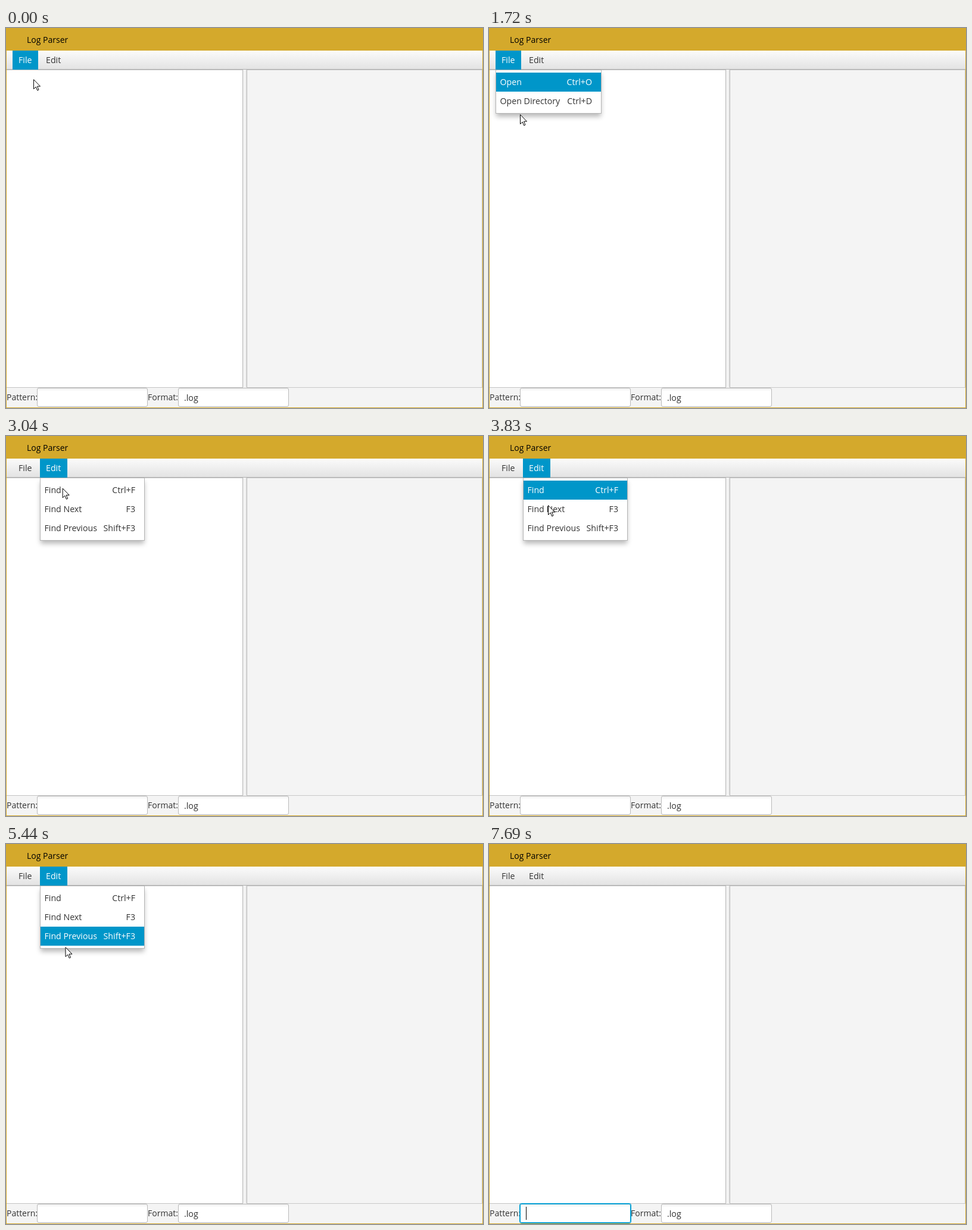
Write an HTML page that moves like this. It is 801 px wide and 639 px high and loops after 8 s.

```html
<!DOCTYPE html>
<html lang="en">
<head>
<meta charset="utf-8">
<title>Log Parser</title>
<style>
  :root { --gold: #d4a92c; --blue: #0096c9; --ink: #333; --line: #bababa; --panel: #f4f4f4; }
  html, body { margin: 0; width: 100%; height: 100%; overflow: hidden; }
  body { font: 14.2px/32px "Open Sans", "Noto Sans", sans-serif; color: var(--ink); white-space: pre; }
  div, svg, span { position: absolute; box-sizing: border-box; }
  #stage { left: 0; top: 0; width: 801px; height: 639px; overflow: hidden; background: var(--panel); }

  .title { left: 0; top: 0; width: 801px; height: 38px; background: var(--gold); }
  .title span { left: 35px; top: 4px; font-size: 14px; color: #000; }
  .frame { inset: 0; border: 1px solid var(--gold); }

  .bar { left: 1px; top: 38px; width: 799px; height: 32px; background: linear-gradient(#fbfbfb, #e3e3e3); border-bottom: 1px solid #b0b0b0; }
  .tab { top: 38px; height: 32px; padding-left: 10px; }
  .left { left: 1px; top: 70px; width: 397px; height: 535px; background: #fff; border: solid #c4c4c4; border-width: 1px 0; }
  .split { left: 397px; top: 70px; width: 8px; height: 534px; border: solid var(--line); border-width: 0 1px; background: linear-gradient(90deg, #eaeaea, #f8f8f8 50%, #dedede); }
  .right { left: 404px; top: 70px; width: 396px; height: 535px; border: 1px solid #c8c8c8; }

  .label { top: 605px; font-size: 14px; line-height: 31px; }
  .field { top: 605px; width: 186px; height: 32px; padding-left: 9px; border: 1px solid var(--line); border-radius: 3px; background: linear-gradient(#f0f0f0, #fff 5px); }
  .caret { left: 61.5px; top: 610px; width: 1.3px; height: 22px; background: #000; }

  .menu { top: 70px; padding: 4px 0; border: 1px solid #b5b5b5; background: #fff; box-shadow: 0 6px 8px -1px rgba(0, 0, 0, .28); }
  .row { position: relative; height: 32px; padding-left: 6.5px; }
  .row span { right: 15px; }

  .tab, .row, .menu, .field, .caret, .arrow, .beam { animation: 8s step-end infinite; }
  .file { animation-name: file; }
  .edit { animation-name: edit; }
  .fileMenu { left: 11px; width: 178px; animation-name: fileMenu; }
  .editMenu { left: 57px; width: 176px; animation-name: editMenu; }
  .open { animation-name: open; }
  .dir { animation-name: dir; }
  .find { animation-name: find; }
  .next { animation-name: next; }
  .prev { animation-name: prev; }
  .pattern { animation-name: focus; }
  .caret { animation-name: blink; }
  .arrow { animation-name: arrow; }
  .beam { animation-name: beam; }
  .pointer { left: 0; top: 0; animation: move 8s infinite; }
  .pointer svg { overflow: visible; width: 12px; height: 20px; }

  @keyframes file {
    0% { background-color: var(--blue); color: #fff; }
    37.99%, 100% { background-color: transparent; color: var(--ink); }
  }
  @keyframes edit {
    0%, 82.5%, 100% { background-color: transparent; color: var(--ink); }
    37.99% { background-color: var(--blue); color: #fff; }
  }
  @keyframes fileMenu {
    0%, 36.12%, 100% { visibility: hidden; }
    8.87% { visibility: visible; }
  }
  @keyframes editMenu {
    0%, 82.5%, 100% { visibility: hidden; }
    37.99% { visibility: visible; }
  }
  @keyframes open {
    0%, 22.4%, 100% { background-color: transparent; color: var(--ink); }
    14.62%, 31.2% { background-color: var(--blue); color: #fff; }
  }
  @keyframes dir {
    0%, 31.2%, 100% { background-color: transparent; color: var(--ink); }
    22.4% { background-color: var(--blue); color: #fff; }
  }
  @keyframes find {
    0%, 55.5%, 100% { background-color: transparent; color: var(--ink); }
    47.8% { background-color: var(--blue); color: #fff; }
  }
  @keyframes next {
    0%, 66.1%, 100% { background-color: transparent; color: var(--ink); }
    55.5% { background-color: var(--blue); color: #fff; }
  }
  @keyframes prev {
    0%, 82.5%, 100% { background-color: transparent; color: var(--ink); }
    66.1% { background-color: var(--blue); color: #fff; }
  }
  @keyframes focus {
    0% { border-color: var(--line); box-shadow: none; }
    82.5%, 100% { border-color: #039ed3; box-shadow: 0 0 0 1px #039ed3; }
  }
  @keyframes blink {
    0%, 90.24% { visibility: hidden; }
    84.49%, 96.12%, 100% { visibility: visible; }
  }
  @keyframes arrow {
    0% { visibility: visible; }
    80.7%, 100% { visibility: hidden; }
  }
  @keyframes beam {
    0% { visibility: hidden; }
    80.7%, 100% { visibility: visible; }
  }

  /* Each move is a run of equal hops; the grouped percentages are rests. */
  @keyframes move {
    0%, 13.74% { transform: translate(31px, 54px); animation-timing-function: steps(2, jump-start); }
    15.7%, 17.49% { transform: translate(34px, 84px); animation-timing-function: steps(5, jump-start); }
    22.45% { transform: translate(37px, 113px); animation-timing-function: steps(4, jump-start); }
    26.35%, 29.24% { transform: translate(42px, 118px); animation-timing-function: steps(4, jump-start); }
    33.05% { transform: translate(68px, 79px); animation-timing-function: steps(4, jump-start); }
    37%, 37.99% { transform: translate(79px, 56px); animation-timing-function: steps(3, jump-start); }
    40.9%, 45.86% { transform: translate(81px, 54px); animation-timing-function: steps(3, jump-start); }
    48.8% { transform: translate(84px, 84px); animation-timing-function: steps(2, jump-start); }
    50.75%, 52.6% { transform: translate(85px, 89px); animation-timing-function: steps(5, jump-start); }
    57.5%, 62.24% { transform: translate(86px, 118px); animation-timing-function: step-start; }
    63.2% { transform: translate(86px, 121px); animation-timing-function: steps(4, jump-start); }
    67.1%, 67.99% { transform: translate(84px, 140px); animation-timing-function: steps(2, jump-start); }
    69.95%, 73.99% { transform: translate(85px, 142px); animation-timing-function: steps(6, jump-start); }
    79.66% { transform: translate(113px, 578px); animation-timing-function: steps(2, jump-start); }
    81.6% { transform: translate(112px, 608px); animation-timing-function: steps(3, jump-start); }
    84.5%, 86.36% { transform: translate(110px, 615px); animation-timing-function: step-start; }
    87%, 100% { transform: translate(111px, 607px); }
  }
</style>
</head>
<body>
<div id="stage">
  <div class="title">
    <svg width="801" height="38" fill="none" stroke="#000">
      <g stroke="none">
        <path fill="#8d8d84" d="M10.5 12.5h18v14h-18z"/>
        <path fill="#f3f5f5" d="M11 13h17v13H11z"/>
        <path fill="#3f9cc0" d="M12 14h8v10h-8z"/>
        <path fill="#a9cfe0" d="M21 14h4v10h-4z"/>
        <path fill="#5d9fba" d="M26 14h1.500v5h-1.500z"/>
      </g>
      <path d="M648 18.500h12M706.500 13.500h11v11h-11zM765 13l12 12M777 13l-12 12"/>
    </svg>
    <span>Log Parser</span>
  </div>

  <div class="left"></div>
  <div class="right"></div>
  <div class="split"></div>
  <div class="bar"></div>
  <div class="tab file" style="left:11px;width:43px">File</div>
  <div class="tab edit" style="left:57px;width:46px">Edit</div>

  <div class="label" style="left:1px">Pattern:</div>
  <div class="label" style="left:238px">Format:</div>
  <div class="field pattern" style="left:52px"></div>
  <div class="field" style="left:289px">.log</div>
  <div class="caret"></div>
  <div class="frame"></div>

  <div class="menu fileMenu"><div class="row open">Open<span>Ctrl+O</span></div><div class="row dir">Open Directory<span>Ctrl+D</span></div></div>
  <div class="menu editMenu"><div class="row find">Find<span>Ctrl+F</span></div><div class="row next">Find Next<span>F3</span></div><div class="row prev">Find Previous<span>Shift+F3</span></div></div>

  <div class="pointer">
    <svg class="arrow"><path fill="#fff" stroke="#000" d="M.5.700V16.500L4.200 13l2.500 5.900 2.300-1-2.500-5.800h5z"/></svg>
    <svg class="beam"><path fill="none" stroke="#000" d="M-3-7.500H0M1-7.500H4M.5-7V7M-3 7.500H0M1 7.500H4"/></svg>
  </div>
</div>
</body>
</html>
```
